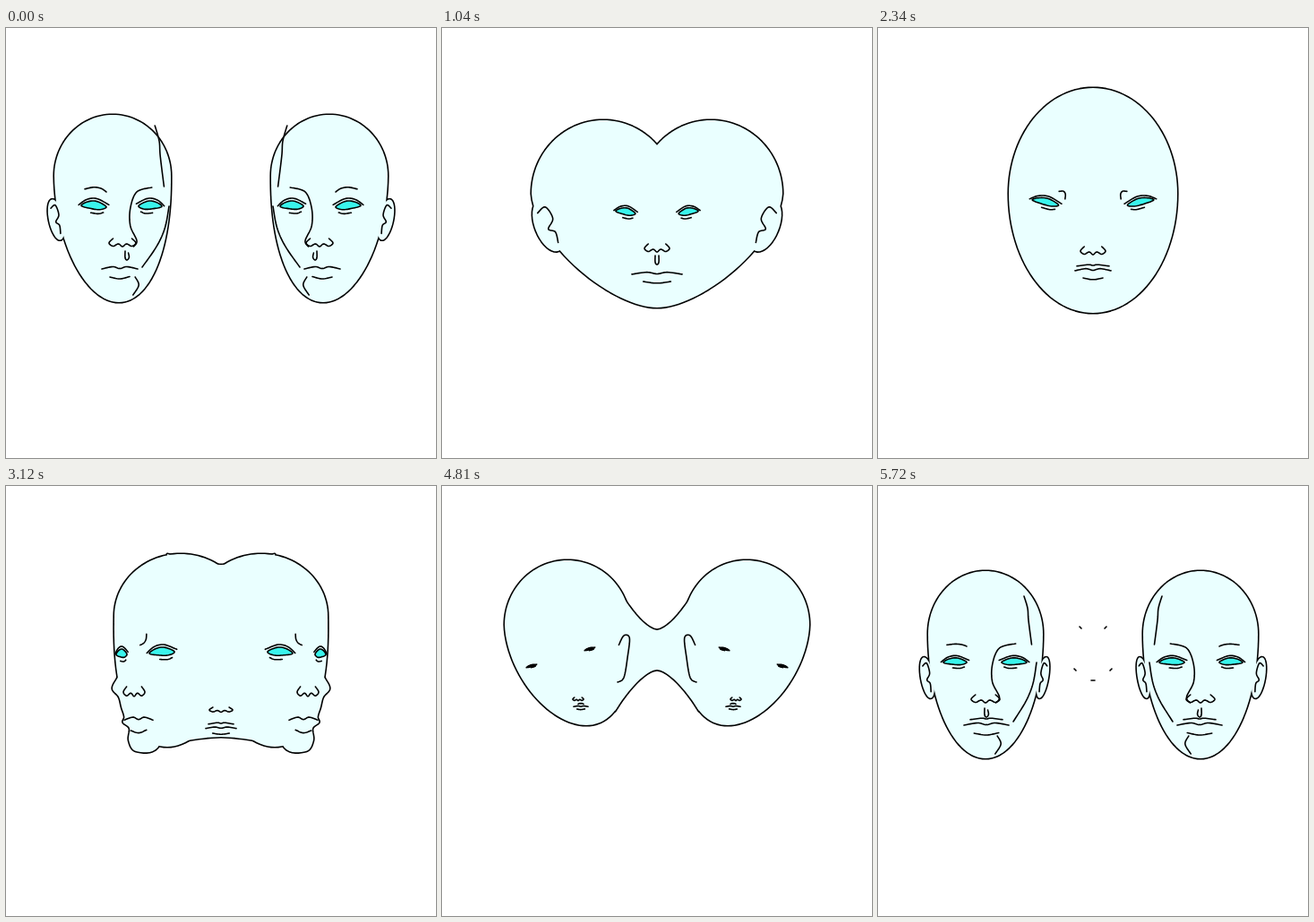
These frames come from a looping animation (480 by 480 pixels, 5.85 s). An HTML page with a canvas:

```html
<!DOCTYPE html>
<html>
<head>
<meta charset="utf-8">
<style>
html, body { margin: 0; height: 100%; overflow: hidden; background: #fff; }
canvas { display: block; }
</style>
</head>
<body>
<canvas id="stage" width="480" height="480"></canvas>
<script>
const ctx = document.getElementById('stage').getContext('2d');
const STEP = 130, STEPS = 45, SEAM = 240, LINE = 1.6;
const SKIN = '#eaffff', IRIS = '#3af4ec';

// Smooth strokes in unit space; a leading "o" closes the curve.
const shapes = {
  eye: ['o-1 .2 -.5 -.6 .2 -.8 1 .1 .5 .7 -.3 .6', '-1.2 .1 -.6 -1 .2 -1.3 1.2 -.3', '-.2 1.4 .4 1.5 .8 1.2'],
  brow: ['-1 .2 -.2 -.3 .5 0 1 1'],
  ridge: ['1.9 -1 .5 -.85 -.1 -.3 -.1 .3 .5 .8 .2 1'],
  nose: ['-.7 -1 -1 0 -.7 .7 -.3 .2 0 .8 .3 .2 .7 .7 1 0 .7 -1'],
  philtrum: ['-.5 -1 -.5 .5 0 1 .6 .4 .4 -.6'],
  lip: ['-1 .4 -.3 -.4 0 0 .3 -.4 1 .4'],
  mouth: ['-1 .1 -.4 -.15 0 .05 .4 -.15 1 .1', '-.55 1 0 1.2 .55 .95'],
  ear: ['-.4 -.6 .3 -.7 .5 -.2 -.1 .1 .3 .3 .2 .7'],
  hook: ['-.8 -.6 0 -1 .9 -.9 .6 -.1 0 .8 -1 1'],
  cheek: ['1 -1 .7 -.3 .1 .3 -1 1'],
  temple: ['-.8 -1 0 -.5 .2 0 .9 1'],
  chin: ['-.2 -1 .8 -.1 -.8 1'],
  profile: ['o-.5 -.96 -.25 -.8 -.6 -.6 -.94 -.37 -.5 -.19 -.3 .04 -.1 .25 -.2 .37 .25 .5 .2 .77 .7 1 2.2 .92 3 .1 1.6 -.87'],
  flecks: ['-1 -1 1 1', '-7 46 -5 48', '12 59 15 59']
};

// head: centre x, level of greatest width, half width, top, chin x, bottom
// bridge: reach, top, bottom, rise of the top edge, fall of the bottom edge
// parts: x, y, half width, half height, tilt in degrees
const poses = [
  { at: 0, drift: 110, ease: 1.4,
    head: [119, 165, 65, 97, 126, 306], bridge: [1, 184, 184, 0, 0],
    parts: {
      ear: [56, 214, 8, 23, -12], temple: [171, 143, 6, 34], cheek: [167, 233, 15, 34], chin: [145, 288, 4, 10],
      brow: [100, 179, 12, 4], eye: [98, 198, 14, 6, 4], eye2: [161, 198, -13, 6], ridge: [140, 211, 12, 33],
      nose: [130, 240, 15, 5], philtrum: [135, 254, 4, 5], mouth: [127, 268, 20, 10] } },
  { at: 8,
    head: [180, 185, 80, 103, 240, 312], bridge: [1, 184, 184, 0, 0],
    parts: {
      ear: [119, 221, 15, 30, -22], eye: [205, 205, 11, 5, 8],
      nose: [240, 246, 14, 5], philtrum: [240, 259, 4, 5], mouth: [240, 274, 28, 9] } },
  { at: 18,
    head: [240, 185, 94, 67, 240, 318], bridge: [20, 70, 312, 0, 0],
    parts: {
      brow: [207, 184, 5, 5, 30], eye: [187, 194, 15, 5, 12],
      nose: [240, 249, 14, 5], lip: [240, 265, 18, 2], mouth: [240, 270, 20, 9] } },
  { at: 24,
    head: [195, 145, 74, 76, 180, 291], bridge: [60, 88, 280, 12, 8],
    parts: {
      profile: [134, 245, 16, 51], brow: [155, 172, 7, 3, 110], eye: [174, 185, 14, 6, -3], eye2: [129, 187, 6, 6],
      nose2: [143, 230, 12, 6], mouth2: [148, 260, 16, 13],
      nose: [240, 250, 13, 3], lip: [240, 265, 14, 2], mouth: [240, 270, 17, 6] } },
  { at: 30,
    head: [164, 155, 75, 78, 174, 295], bridge: [38, 135, 241, 40, 42],
    parts: {
      ear: [92, 203, 12, 25, -18], brow: [199, 169, 6, 3, -40], eye: [209, 185, 12, 5, -12], eye2: [146, 183, 14, 5, 5],
      ridge: [180, 187, -15, 23], nose2: [185, 229, 17, 6], philtrum2: [185, 243, 4, 6],
      lip2: [183, 249, 12, 2], mouth2: [182, 256, 24, 11] } },
  { at: 37,
    head: [140, 155, 70, 83, 161, 267], bridge: [47, 161, 205, 52, 46],
    parts: {
      hook: [203, 193, 7, 26], eye: [165, 182, 5, 1, -15], eye2: [100, 201, 5, 1, -15],
      nose2: [152, 238, 6, 2], lip2: [155, 243, 3, 1], mouth2: [155, 246, 8, 3] } },
  { at: 44,
    head: [120, 165, 64, 95, 120, 304], bridge: [60, 184, 184, 20, 20],
    parts: {
      ear: [55, 214, 7, 23, -10], ear2: [184, 214, -6, 23, 10],
      temple: [167, 150, 5, 27], cheek: [164, 230, 13, 33], chin: [134, 289, 4, 10],
      brow2: [88, 177, 11, 2], eye: [152, 196, -14, 5], eye2: [86, 196, 13, 5], ridge: [129, 209, 13, 33],
      nose2: [120, 238, 16, 5], philtrum2: [121, 253, 4, 5], lip2: [121, 260, 18, 2], mouth2: [121, 266, 25, 10],
      flecks: [226, 158, 1, 1] } }
];

const mix = (a, b, t) => a + (b - a) * t;
const mixAll = (a, b, t) => a.map((v, i) => mix(v, b[i], t));
const kind = name => name.replace(/\d/, '');
const ring = (n, f) => Array.from({ length: n }, (_, i) => f(i / n * 2 * Math.PI));

// Catmull-Rom curve through the knots
function smooth(text) {
  const closed = text[0] === 'o', v = text.replace('o', '').split(' ').map(Number), n = v.length / 2;
  const knot = (i, axis) => v[(closed ? (i + n) % n : Math.max(0, Math.min(n - 1, i))) * 2 + axis];
  const count = (closed ? n : n - 1) * 8;
  return Array.from({ length: count + 1 }, (_, k) => {
    const i = Math.floor(k / 8), f = k / 8 - i;
    return [0, 1].map(axis => {
      const [a, b, c, d] = [-1, 0, 1, 2].map(o => knot(i + o, axis));
      return b + f / 2 * (c - a + f * (2 * a - 5 * b + 4 * c - d + f * (3 * (b - c) + d - a)));
    });
  });
}
for (const name in shapes) shapes[name] = shapes[name].map(smooth);
const oval = ring(40, a => [Math.sin(a), Math.cos(a)]);

function pathOf(points, closed) {
  const path = new Path2D();
  points.forEach(([x, y]) => path.lineTo(x, y));
  if (closed) path.closePath();
  return path;
}

function place(points, [x, y, w, h, tilt], closed) {
  const c = Math.cos(tilt * Math.PI / 180), s = Math.sin(tilt * Math.PI / 180);
  return pathOf(points.map(([u, v]) => [x + u * w * c - v * h * s, y + u * w * s + v * h * c]), closed);
}

// Half an ellipse above, and below it one that leans towards the chin
function headPath([cx, cy, w, top, chin, bottom]) {
  return pathOf(ring(120, a => {
    const low = Math.max(0, -Math.cos(a)), high = Math.max(0, Math.cos(a));
    return [mix(cx, chin, low ** 1.5) + w * Math.sin(a), cy + (bottom - cy) * low - (cy - top) * high];
  }), true);
}

function bridgePath([reach, top, bottom, rise, fall]) {
  const edge = (y, bend) => Array.from({ length: 13 }, (_, i) => {
    const u = 1 - i / 12;
    return [SEAM - reach * u, y + bend * u ** 1.6];
  });
  return pathOf([...edge(top, -rise), [SEAM + 9, top], [SEAM + 9, bottom], ...edge(bottom, fall).reverse()], true);
}

// Where a part stands; parts of only one pose shrink away or grow in
function placement(a, b, t, drift) {
  const full = p => [...p, 0].slice(0, 5);
  if (a && b) return mixAll(full(a), full(b), t);
  const [x, y, w, h, tilt] = full(a || b);
  const size = Math.max(0, Math.min(1, 2 * (a ? 1 - t / 0.7 : (t - 0.4) / 0.6)));
  return [x + drift * (a ? t : t - 1), y, w * size, h * size, tilt];
}

function drawHalf(from, to, t) {
  const names = [...new Set([...Object.keys(from.parts), ...Object.keys(to.parts)])];
  const parts = names
    .map(name => [kind(name), placement(from.parts[name], to.parts[name], t, from.drift || 0)])
    .filter(([, spot]) => spot[2]);

  // Body pieces are all outlined, then all filled, so that they join into one silhouette.
  const body = [headPath(mixAll(from.head, to.head, t))];
  const bridge = mixAll(from.bridge, to.bridge, t);
  if (bridge[2] - bridge[1] > 4) body.push(bridgePath(bridge));
  for (const [type, spot] of parts) {
    if (type === 'ear') body.push(place(oval, spot, true));
    if (type === 'profile') body.push(place(shapes.profile[0], spot, true));
  }
  ctx.lineWidth = LINE * 2;
  body.forEach(path => ctx.stroke(path));
  ctx.fillStyle = SKIN;
  body.forEach(path => ctx.fill(path));

  ctx.lineWidth = LINE;
  ctx.fillStyle = IRIS;
  for (const [type, spot] of parts) {
    if (type === 'profile') continue;
    shapes[type].forEach((stroke, i) => {
      const path = place(stroke, spot);
      if (type === 'eye' && i === 0) ctx.fill(path);
      ctx.stroke(path);
    });
  }
}

function draw(now) {
  const step = Math.floor(now / STEP) % STEPS;
  const i = Math.min(poses.length - 2, poses.findLastIndex(p => p.at <= step));
  const from = poses[i], to = poses[i + 1];
  const t = ((step - from.at) / (to.at - from.at)) ** (from.ease || 1);

  ctx.fillStyle = '#fff';
  ctx.fillRect(0, 0, 480, 480);
  ctx.lineJoin = ctx.lineCap = 'round';
  for (const side of [1, -1]) {
    ctx.save();
    ctx.setTransform(side, 0, 0, 1, side > 0 ? 0 : 480, 0);
    ctx.beginPath();
    ctx.rect(0, 0, SEAM, 480);
    ctx.clip();
    drawHalf(from, to, t);
    ctx.restore();
  }
  requestAnimationFrame(draw);
}
requestAnimationFrame(draw);
</script>
</body>
</html>
```
